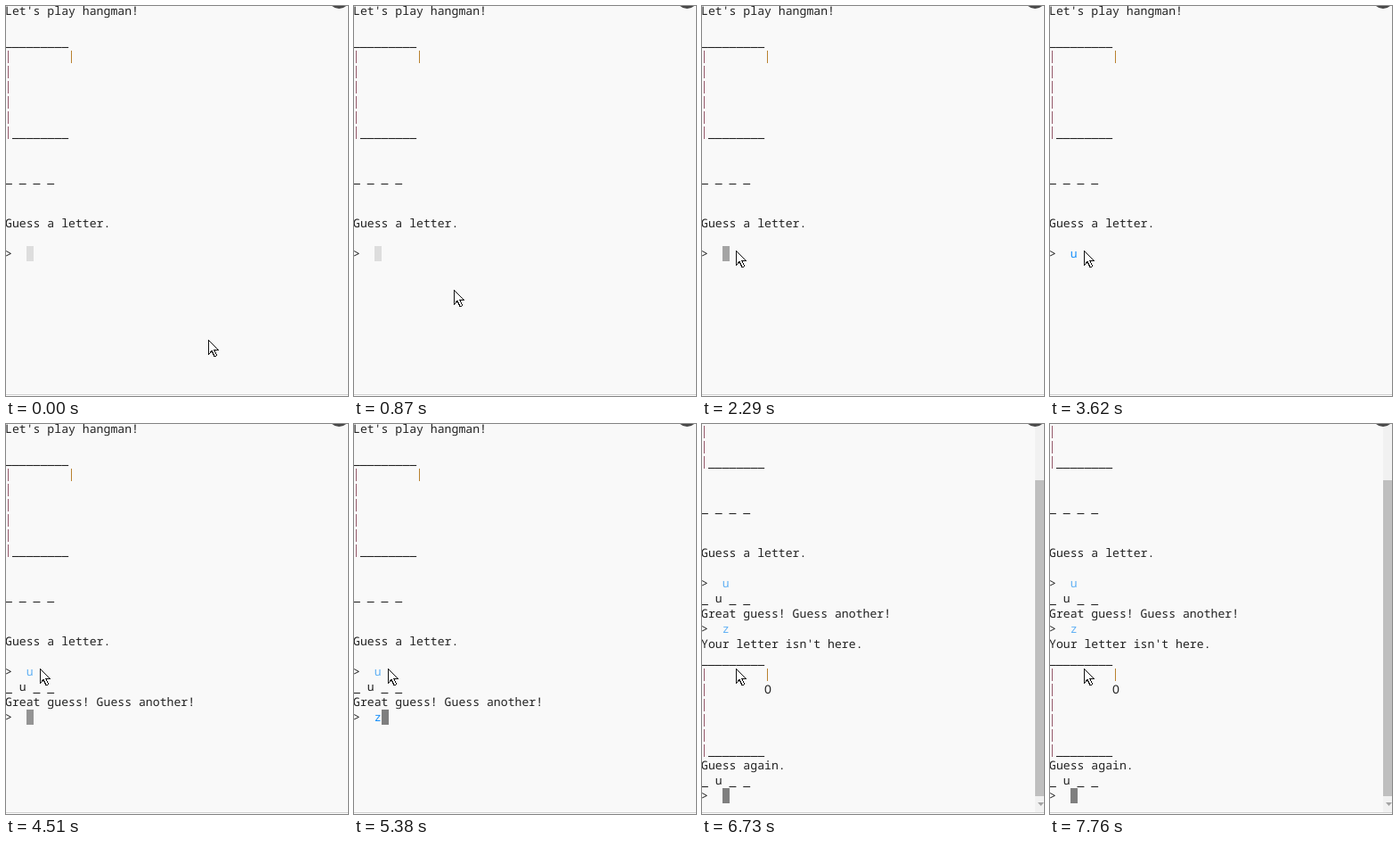
Recreate the animation shown at these times as an HTML page. Size 384x437 px, loop 8 s.

```html
<!DOCTYPE html>
<html lang="en">
<head>
<meta charset="utf-8">
<title>Hangman console</title>
<style>
  html, body { margin: 0; width: 100%; height: 100%; overflow: hidden; background: #f9f9f9; }
  svg { display: block; width: 384px; height: 437px; }
  text {
    font: 13.167px "Noto Sans Mono", "DejaVu Sans Mono", monospace;
    white-space: pre;
    text-rendering: geometricPrecision;
  }
</style>
</head>
<body>
<svg viewBox="0 0 384 437">
  <g id="page"></g>
  <g id="scrollbar">
    <rect x="374" width="10" height="435" fill="#f1f1f1"/>
    <rect x="374" y="63" width="10" height="354" fill="#bfbfbf"/>
    <path d="M377 424h7l-3.5 4z" fill="#a3a3a3"/>
  </g>
  <circle cx="374" cy="-9" r="12" fill="#484848"/>
  <rect y="435" width="384" height="1" fill="#d0d0d0"/>
  <rect y="436" width="384" height="1" fill="#fdfdfd"/>
  <path id="pointer" fill="#fff" stroke="#111" shape-rendering="crispEdges"
        d="M.5.5V16.5L4 12.5 7 18.5H8.5L9.5 17.5 7 11.5H11.5Z"/>
</svg>
<script>
const LOOP = 8000, CELL = 7.9, LEFT = -1, ROW = 17, TOP = -3;
const FOCUS = 1830, TYPE_U = 3620, ENTER_U = 4070, TYPE_Z = 5380, ENTER_Z = 6730;
const BLINK = 1010, TICK = 75, TICK_START = 45;
const INK = '#222', TYPED = '#1a90fa', SENT = '#62b1f4', POST = '#94596a', ROPE = '#b8812e';

const page = document.getElementById('page');
const scrollbar = document.getElementById('scrollbar');
const pointer = document.getElementById('pointer');
const timed = [];

const cellX = col => LEFT + col * CELL;
const rowY = row => TOP + row * ROW;
const ramp = (t, start, end) => Math.min(1, Math.max(0, (t - start) / (end - start)));

function add(tag, attributes, from = 0) {
  const node = document.createElementNS('http://www.w3.org/2000/svg', tag);
  for (const key in attributes) node.setAttribute(key, attributes[key]);
  page.append(node);
  timed.push({ node, from });
  return node;
}

function write(row, col, string, from, drop = 0) {
  const node = add('text', { x: cellX(col), y: rowY(row) + 13 + drop, fill: INK }, from);
  node.textContent = string;
  return node;
}

// Underscores sit one pixel below the font's own position.
const blanks = (row, col, string, from) => write(row, col, string, from, 1);

function bar(row, x, fill, from) {
  add('rect', { x, y: rowY(row) + 2, width: 1, height: 14, fill }, from);
}

function gallows(row, from) {
  blanks(row, 0, '_'.repeat(9), from);
  for (let i = 1; i <= 6; i++) bar(row + i, 2, POST, from);
  bar(row + 1, 73, ROPE, from);
  blanks(row + 6, 1, '_'.repeat(8), from);
}

function word(row, from) {
  blanks(row, 0, '_   _ _', from);
  write(row, 2, 'u', from);
}

const cursor = add('rect', { width: 8, height: ROW, fill: '#7f7f7f' });

write(0, 0, "Let's play hangman!");
gallows(2);
blanks(11, 0, '_ _ _ _');
write(14, 0, 'Guess a letter.');
write(16, 0, '>');
const letterU = write(16, 3, 'u', TYPE_U);

word(17, ENTER_U);
write(18, 0, 'Great guess! Guess another!', ENTER_U);
write(19, 0, '>', ENTER_U);
const letterZ = write(19, 3, 'z', TYPE_Z);

write(20, 0, "Your letter isn't here.", ENTER_Z);
gallows(21, ENTER_Z);
write(23, 9, 'O', ENTER_Z);
write(28, 0, 'Guess again.', ENTER_Z);
word(29, ENTER_Z);
write(30, 0, '>', ENTER_Z);

// Each prompt restarts the blink: solid, a quick fade, then hidden.
function cursorOpacity(t) {
  if (t < FOCUS) return 0.23;
  const start = [ENTER_Z, ENTER_U, FOCUS].find(time => t >= time);
  return 1 - ramp((t - start) % BLINK / BLINK, 0.41, 0.56);
}

function placeCursor(t) {
  const row = t < ENTER_U ? 16 : t < ENTER_Z ? 19 : 30;
  const typed = t >= TYPE_U && t < ENTER_U || t >= TYPE_Z && t < ENTER_Z;
  cursor.setAttribute('x', Math.round(cellX(typed ? 4 : 3)));
  cursor.setAttribute('y', rowY(row));
  cursor.setAttribute('opacity', cursorOpacity(t));
}

// Two straight strokes, advanced in small steps.
function placePointer(t) {
  const step = Math.floor((t - TICK_START) / TICK) * TICK + TICK_START;
  const first = ramp(step, 120, 570), second = ramp(step, 820, 1470);
  const x = Math.round(227 - 109 * first - 80 * second);
  const y = Math.round(374 - 52 * first - 48 * second);
  pointer.setAttribute('transform', `translate(${x} ${y})`);
}

function draw(t) {
  for (const { node, from } of timed) node.style.display = t >= from ? '' : 'none';
  letterU.setAttribute('fill', t < ENTER_U ? TYPED : SENT);
  letterZ.setAttribute('fill', t < ENTER_Z ? TYPED : SENT);

  const scrolled = t >= ENTER_Z;
  page.setAttribute('transform', `translate(0 ${scrolled ? -99 : 0})`);
  scrollbar.style.display = scrolled ? '' : 'none';

  placeCursor(t);
  placePointer(t);
}

function frame() {
  draw(performance.now() % LOOP);
  requestAnimationFrame(frame);
}
frame();
</script>
</body>
</html>
```
